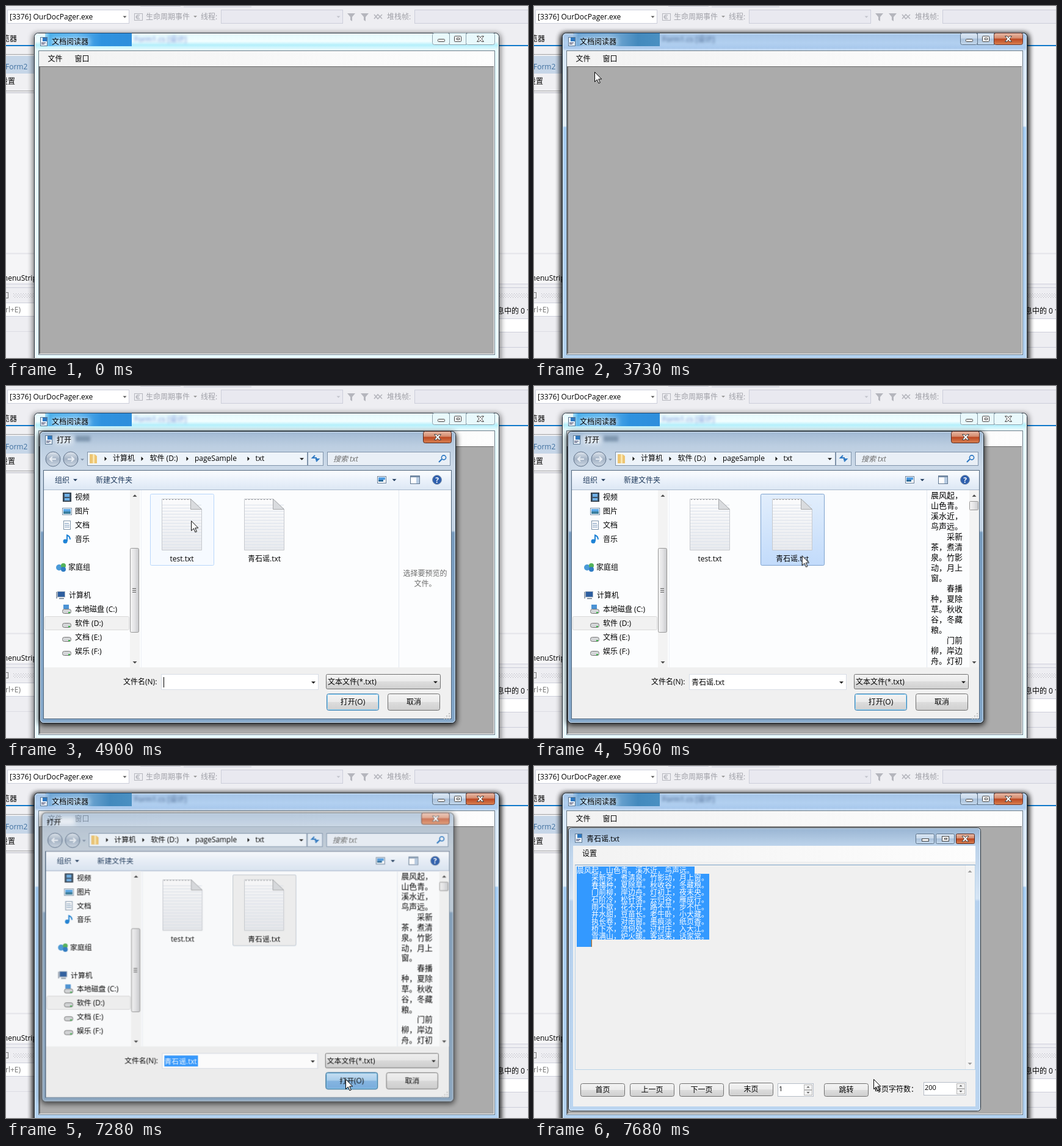
An HTML page that plays this animation: 855x578 px, repeating every 8 s.

```html
<!DOCTYPE html>
<html lang="zh-CN">
<head>
<meta charset="utf-8">
<title>文档阅读器</title>
<style>
html, body { margin: 0; width: 100%; height: 100%; overflow: hidden; background: #eeeef2; }
svg { display: block; width: 855px; height: 578px; font: 12px "Open Sans", "Noto Sans CJK SC", "Noto Sans CJK", sans-serif; }
text { white-space: pre; }
.mid { text-anchor: middle; }
.cjk { font-family: "Noto Sans CJK SC", "Noto Sans CJK", sans-serif; }
.anim { animation: 8s step-end infinite; }
/* One percent of the loop is 80 ms. */
#active { animation-name: active; animation-timing-function: linear; }
#menuHot { animation-name: menuHot; }
#menu { animation-name: menu; animation-timing-function: linear; }
#menuItemHot { animation-name: menuItemHot; }
#dialog { animation-name: dialog; animation-timing-function: linear; transform-origin: 395px 314px; }
#dialogGlass { animation-name: dialogGlass; }
#dialogIcon { animation-name: dialogIcon; }
#dialogTitle { animation-name: dialogTitle; }
#hoverA { animation-name: hoverA; }
#hoverB { animation-name: hoverB; }
#chosen, #preview { animation-name: chosen; }
#hint { animation-name: hint; }
#chosenDim, #nameMarked, #openDown { animation-name: accepted; }
#caret { animation-name: caret; }
#openHot { animation-name: openHot; }
#child { animation-name: child; }
#page { animation-name: page; }
#cursor { animation-name: cursor; animation-timing-function: linear; }
@keyframes active { 0%, 17.24% { opacity: 0 } 17.25%, 47.4% { opacity: 1 } 51.1%, 89.9% { opacity: 0 } 90%, 100% { opacity: 1 } }
@keyframes menuHot { 0% { opacity: 0 } 10.8% { opacity: 1 } 35.75%, 100% { opacity: 0 } }
@keyframes menu { 0%, 35.74% { opacity: 0 } 35.75%, 44.2% { opacity: 1 } 46.2%, 100% { opacity: 0 } }
@keyframes menuItemHot { 0% { opacity: 0 } 40.5%, 100% { opacity: 1 } }
@keyframes dialog {
  0%, 53.2% { opacity: 0; transform: scale(.96) }
  53.25% { opacity: .3; transform: scale(.97) }
  56.1%, 90% { opacity: 1; transform: none }
  91% { opacity: .96; transform: scale(.99) }
  93%, 100% { opacity: 0; transform: scale(.96) }
}
@keyframes dialogGlass { 0% { opacity: 1 } 90%, 100% { opacity: .78 } }
@keyframes dialogIcon { 0% { opacity: 1 } 90%, 100% { opacity: 0 } }
@keyframes dialogTitle { 0% { transform: none } 90%, 100% { transform: translate(-20px, 1px) } }
@keyframes hoverA { 0% { opacity: 0 } 59.5% { opacity: 1 } 66%, 100% { opacity: 0 } }
@keyframes hoverB { 0% { opacity: 0 } 67.5% { opacity: 1 } 72.6%, 100% { opacity: 0 } }
@keyframes chosen { 0% { opacity: 0 } 72.6%, 100% { opacity: 1 } }
@keyframes hint { 0% { opacity: 1 } 72.6%, 100% { opacity: 0 } }
@keyframes accepted { 0% { opacity: 0 } 89%, 100% { opacity: 1 } }
@keyframes caret { 0% { opacity: 0 } 58.8% { opacity: 1 } 65.5%, 100% { opacity: 0 } }
@keyframes openHot { 0% { opacity: 0 } 81.5%, 100% { opacity: 1 } }
@keyframes child { 0% { opacity: 0 } 94.75%, 100% { opacity: 1 } }
@keyframes page { 0% { opacity: 0 } 96%, 100% { opacity: 1 } }
@keyframes cursor {
  0%, 1.6% { transform: translate(738px, 590px) }
  1.65% { transform: translate(735px, 562px); animation-timing-function: ease-in-out }
  11.6% { transform: translate(78px, 91px) }
  12.6%, 27% { transform: translate(78px, 88px) }
  30%, 38.5% { transform: translate(71px, 83px) }
  41.4%, 53.2% { transform: translate(99px, 108px) }
  56.1%, 58% { transform: translate(250px, 162px) }
  61.25% { transform: translate(303px, 221px) }
  63%, 64% { transform: translate(312px, 232px) }
  70.75%, 73.5% { transform: translate(424px, 246px) }
  82.4% { transform: translate(553px, 530px) }
  83.1%, 85% { transform: translate(553px, 532px) }
  87.5%, 100% { transform: translate(556px, 514px) }
}
</style>
</head>
<body>
<svg id="stage" viewBox="0 0 855 578" xmlns="http://www.w3.org/2000/svg"></svg>
<script>
const FILE = '青石谣.txt';
const POEM = [
  '晨风起，山色青。溪水近，鸟声远。', '采新茶，煮清泉。竹影动，月上窗。',
  '春播种，夏除草。秋收谷，冬藏粮。', '门前柳，岸边舟。灯初上，夜未央。',
  '石阶冷，松针落。云归谷，雁成行。', '雨不歇，花不开。路不平，步不忙。',
  '井水甜，豆苗长。老牛卧，小犬藏。', '执长卷，对南窗。墨痕淡，纸页香。',
  '桥下水，流何处。过村庄，入大江。', '雪满山，炉火暖。客远来，话家常。'
];

const rect = (x, y, w, h, fill, more = '') =>
  `<rect x="${x}" y="${y}" width="${w}" height="${h}" fill="${fill}" ${more}/>`;
const box = (x, y, w, h, fill, stroke, r = 0, more = '') =>
  rect(x + .5, y + .5, w - 1, h - 1, fill, `stroke="${stroke}" rx="${r}" ${more}`);
const text = (x, y, s, fill = '#000', more = '') => `<text x="${x}" y="${y}" fill="${fill}" ${more}>${s}</text>`;
const mid = (x, y, s, fill = '#000') => text(x, y, s, fill, 'class="mid"');
const path = (d, fill, more = '') => `<path d="${d}" fill="${fill}" ${more}/>`;
const line = (d, stroke, w = 1, more = '') => path(d, 'none', `stroke="${stroke}" stroke-width="${w}" ${more}`);
const circle = (x, y, r, fill, more = '') => `<circle cx="${x}" cy="${y}" r="${r}" fill="${fill}" ${more}/>`;
const down = (x, y, fill = '#1c1c1c', s = 3.5) => path(`M${x - s} ${y - s / 2}h${2 * s}l${-s} ${s}z`, fill);
const up = (x, y, fill = '#444', s = 3.5) => path(`M${x - s} ${y + s / 2}h${2 * s}l${-s} ${-s}z`, fill);
const right = (x, y) => path(`M${x - 1.5} ${y - 3.5}v7l3.5 -3.5z`, '#111');
const group = (id, body) => `<g id="${id}" class="anim">${body}</g>`;
const gradient = (id, stops, across) =>
  `<linearGradient id="${id}" x2="${across ? 1 : 0}" y2="${across ? 0 : 1}">` +
  stops.map(([o, c, a = 1]) => `<stop offset="${o}" stop-color="${c}" stop-opacity="${a}"/>`).join('') + '</linearGradient>';
const blur = (id, d) => `<filter id="${id}" x="-30%" y="-80%" width="160%" height="260%"><feGaussianBlur stdDeviation="${d}"/></filter>`;
const shadow = (x, y, w, h, r, filter, opacity) => rect(x, y, w, h, '#000', `rx="${r}" filter="url(#${filter})" opacity="${opacity}"`);

const defs = `<defs>
  ${blur('soft', 2)}${blur('glow', 4)}
  <filter id="wide" x="-10%" y="-10%" width="120%" height="120%"><feGaussianBlur stdDeviation="5"/></filter>
  <pattern id="dots" width="4" height="4" patternUnits="userSpaceOnUse"><path d="M0 0h1v1H0zM2 2h1v1H2z" fill="#b2b2ba"/></pattern>
  ${gradient('pale', [[0, '#e2f9fd'], [.025, '#f2feff'], [.036, '#b4effb'], [.05, '#e8fcff'], [1, '#e9fbff']])}
  ${gradient('blue', [[0, '#a5c4e6'], [.03, '#b2d0f0'], [.045, '#a9c9ed'], [.054, '#d8e8f9'], [.28, '#e4effa'], [.285, '#a6cdf3'], [1, '#b4d3f1']])}
  ${gradient('tabPale', [[0, '#6fc4f3', .6], [.06, '#4aaeea'], [.35, '#62b6ef'], [.65, '#2f92df'], [1, '#2e8edc']], 1)}
  ${gradient('tabBlue', [[0, '#8fbbe2', .5], [.06, '#6fa6d6'], [.4, '#7fb0da'], [.75, '#4389bd'], [1, '#4a90c2']], 1)}
  ${gradient('strip', [[0, '#f2f2f2'], [1, '#fdfdfd']], 1)}
  ${gradient('red', [[0, '#e8bba8'], [.45, '#d58a6c'], [.5, '#bb4722'], [1, '#d98252']])}
  ${gradient('ctl', [[0, '#dbe7f4'], [.45, '#c8d9eb'], [.5, '#aac2dc'], [1, '#c4d8ec']])}
  ${gradient('button', [[0, '#f3f3f3'], [.48, '#ebebeb'], [.5, '#dddddd'], [1, '#cfcfcf']])}
  ${gradient('hot', [[0, '#eaf6fd'], [.48, '#d9f0fc'], [.5, '#bee6fd'], [1, '#a7d9f5']])}
  ${gradient('pressed', [[0, '#cbe3f6'], [.48, '#a9d0f0'], [.5, '#84b6e4'], [1, '#78aee0']])}
  ${gradient('glass', [[0, '#a0b8d2'], [.05, '#bccee1'], [.12, '#cbd9e8'], [.34, '#c3d3e4'], [.347, '#7a9dbf'], [1, '#84a7c9']])}
  ${gradient('tools', [[0, '#fbfdff'], [.5, '#eaf1fa'], [1, '#dce7f4']])}
  ${gradient('nav', [[0, '#dfe6ee'], [.5, '#a5b4c6'], [1, '#ccd7e3']])}
  ${gradient('pick', [[0, '#e2eefc'], [1, '#c2dbfb']])}
  ${gradient('paper', [[0, '#fbfbfc'], [1, '#e8eaee']])}
  ${gradient('thumb', [[0, '#f5f5f5'], [.5, '#e4e4e6'], [1, '#c9cacd']], 1)}
  ${gradient('childGlass', [[0, '#98b4d2'], [.06, '#bbd2ea'], [.25, '#d6e5f5'], [.26, '#b6d1ee'], [1, '#bbd5f0']])}
</defs>`;

function backdrop() {
  const combo = (x, w, fill) => box(x, 6, w, 23, fill, '#ccceda');
  const grey = '#a0a1a8';
  const funnel = x => path(`M${x} 12h13l-5 6v7l-3 -2v-5z`, '#b5b6bd');
  return rect(0, 0, 855, 578, '#eeeef2') +
    line('M220 .5h66M291 1.5h111', '#ccceda') +
    combo(2, 200, '#fff') + text(6, 22, '[3376] OurDocPager.exe') + down(194.5, 18, '#555', 3) +
    box(210, 12, 14, 12, 'none', '#b5b6bd') + line('M219 15h-4l-2 3l2 3h4M213 18h5', '#b5b6bd', 1.4) +
    text(229, 22, '生命周期事件', grey) + down(310, 17.5, '#999', 3) + text(319, 22, '线程:', grey) +
    combo(352, 200, '#e9e9f0') + down(544.5, 18, '#c2c3cb', 3) + funnel(559) + funnel(581) + circle(591, 22, 2, '#eeeef2') +
    line('M603 14l6 7l7 -7M603 21l6 -7l7 7', '#b5b6bd', 1.6) + text(624, 22, '堆栈帧:', grey) + combo(669, 190, '#e9e9f0') +
    text(-6, 58, '览器') + rect(0, 64, 855, 2, '#1079cb') +
    rect(0, 66, 855, 391, '#f5f5f7') + rect(0, 66, 46, 76, '#f0f0f3') +
    line('M0 79.5h46M0 139.5h46', '#555', 1, 'stroke-dasharray="1 1"') +
    rect(0, 82, 46, 29, '#c6d6e8') + text(-1, 104, 'Form2', '#3e6f9f') + text(-9, 128, '设置') +
    line('M0 142.5h46', '#b9bac4') + line('M0 406.5h855', '#e4e4ea', 2) + text(-8, 451, 'menuStrip1') +
    line('M0 456.5h855M0 462.5h855', '#ccceda') +
    rect(12, 472, 34, 7, 'url(#dots)') + rect(808, 472, 47, 7, 'url(#dots)') + box(-6, 470, 10, 10, 'none', '#777') +
    box(-2, 487, 60, 23, '#fff', '#ccceda') + text(-1, 503, 'rl+E)', '#777') +
    line('M0 534.5h46', '#dcdce4') + text(804, 505, '息中的 0 个') +
    box(790, 513, 80, 23, '#fff', '#ccceda') + line('M808 560.5h47', '#ccceda');
}

const appIcon = (x, y) => box(x, y, 12, 15, '#e8f1fa', '#5d7892') +
  rect(x + 4, y + 1, 7, 6, '#2e78c0') + line(`M${x + 2} ${y + 9.5}h7M${x + 2} ${y + 11.5}h5`, '#446');
const cross = (x, y) => path(
  `M${x - 5.5} ${y - 4.5}h3.5l2 2.5l2 -2.5h3.5l-3.5 4.5l3.5 4.5h-3.5l-2 -2.5l-2 2.5h-3.5l3.5 -4.5z`, '#fff', 'stroke="#444"');

function captionButtons(active) {
  const edge = active ? '#5d7288' : '#8fa3ae';
  const fill = active ? 'url(#ctl)' : '#e9f9fc';
  return box(698, 44, 29, 20, fill, edge, 3) + box(726, 44, 28, 20, fill, edge) +
    box(753, 44, 48, 20, active ? 'url(#red)' : fill, active ? '#6a3a32' : edge, 3) +
    box(707, 54, 12, 5, '#fff', '#444', 1) + box(734, 49, 12, 10, '#fff', '#444', 1) + box(738, 52, 5, 4, '#fff', '#444') +
    cross(777, 54);
}

function mainFrame(active) {
  return shadow(44, 45, 766, 545, 7, 'wide', active ? .85 : .55) +
    box(46, 44, 762, 545, active ? 'url(#blue)' : 'url(#pale)', '#22313d', 6) +
    box(47, 45, 760, 543, 'none', active ? '#e3f0fc' : '#fbffff', 5) +
    rect(64, 45, 142, 21, `url(#${active ? 'tabBlue' : 'tabPale'})`) + line('M66 44.5h140', '#1c4a75') +
    text(210, 59, 'Form1.cs [设计]', active ? '#3f5c86' : '#5e7fd0', 'filter="url(#soft)"') + captionButtons(active);
}

function mainWindow() {
  return mainFrame(false) + group('active', mainFrame(true)) +
    rect(76, 54, 60, 10, '#dff1ff', 'filter="url(#glow)" opacity=".9"') + appIcon(56, 51) + text(75, 63, '文档阅读器') +
    box(53, 73, 748, 500, '#f4f4f4', '#6a7a86') + rect(54, 74, 746, 25, 'url(#strip)') +
    rect(54, 99, 746, 473, '#fff') + rect(54, 99, 745, 472, '#696969') + rect(56, 100, 743, 471, '#ababab') +
    group('menuHot', box(60, 76, 44, 22, '#b9dcfb', '#3399ff')) + text(68.5, 91, '文件') + text(112.5, 91, '窗口');
}

function dropMenu() {
  return shadow(56, 101, 105, 65, 0, 'soft', .4) + box(60, 76, 44, 23, '#fafafa', '#808080') + text(68.5, 91, '文件') +
    box(53, 97, 106, 68, '#fdfdfd', '#808080') + rect(55, 99, 24, 64, '#f1f1f1') +
    group('menuItemHot', box(55, 99, 102, 21, '#b9dcfb', '#3399ff')) +
    ['打开', '关闭', '退出'].map((s, i) => text(87, 114 + 21 * i, s)).join('');
}

function sidebar() {
  const drive = y => box(92, y - 5, 15, 8, '#d4d6d8', '#777', 3) + rect(102, y, 3, 2, '#3db54a');
  const rows = [[113, 187, '视频'], [113, 210, '图片'], [113, 233, '文档'], [113, 256, '音乐'], [102, 302, '家庭组'], [103, 348, '计算机'],
    [113, 371, '本地磁盘 (C:)'], [113, 394, '软件 (D:)'], [113, 417, '文档 (E:)'], [113, 440, '娱乐 (F:)']];
  return box(63, 378, 139, 23, '#f1f1f1', '#d9d9d9', 2) +
    box(93, 175, 14, 15, '#3f5468', '#26323e') + rect(96, 177, 8, 5, '#6fb0e6') + rect(96, 184, 8, 4, '#6fb0e6') +
    box(92, 200, 16, 12, '#fff', '#7b92a8') + rect(94, 202, 12, 4, '#5aa7e6') + rect(94, 206, 12, 4, '#3b7f9f') +
    box(94, 221, 12, 15, '#fff', '#7b92a8') + line('M96 225.5h7M96 228.5h8M96 231.5h8', '#6c8fb5') +
    circle(97, 255, 3.5, '#1f83d6') + line('M100 255V245q5 2 5 7', '#1f83d6', 2) +
    circle(87, 298, 5, '#4a9ad8') + circle(94, 295, 4, '#54b35a') + circle(94, 301, 4, '#2f7cc4') +
    box(84, 337, 13, 10, '#2d5e9f', '#a8b4c2') + rect(87, 348, 8, 2, '#8c98a6') + rect(82, 338, 2, 11, '#9aa6b3') +
    drive(371) + rect(94, 359, 9, 7, '#4b92d4') + [394, 417, 440].map(drive).join('') +
    rows.map(([x, y, s]) => text(x, y, s)).join('') +
    rect(203, 171, 16, 291, '#f3f3f3') + up(211, 180) + down(211, 454, '#444') +
    box(203, 266, 15, 139, 'url(#thumb)', '#979797', 2) + line('M207 332.5h6M207 335.5h6M207 338.5h6', '#555') +
    line('M221.5 171v291', '#eef1f6');
}

function fileItem(x, label, state) {
  let rules = '';
  for (let y = 195; y < 268; y += 5) rules += `M${x + 20} ${y}.5h64`;
  return state + path(`M${x + 19.5} 185.5h47l18 17v67h-65z`, 'url(#paper)', 'stroke="#c6c9ce"') + line(rules, '#dde3ec') +
    path(`M${x + 66.5} 185.5v17h18z`, '#d9dbde', 'stroke="#a6a8ab"') +
    line(`M${x + 21} 186.5h46`, '#8f9296', 1, 'stroke-dasharray="2 3"') + mid(x + 52, 288, label);
}

function previewPane() {
  const rows = POEM.flatMap((s, i) => (i ? '　　' + s : s).match(/.{1,4}/g)).slice(0, 17);
  return rows.map((s, i) => text(650, 184 + 17 * i, s, '#000', 'class="cjk" font-size="13"')).join('') +
    rect(713, 171, 16, 291, '#f3f3f3') + up(721, 180) + down(721, 454, '#444') + box(713, 189, 15, 15, 'url(#thumb)', '#979797', 1);
}

function dialog() {
  const itemBox = (x, fill, stroke) => box(x, 177, 105, 118, fill, stroke, 2);
  const navy = '#1e395b';
  const navButton = (x, d) => circle(x, 120, 12, 'url(#nav)', 'stroke="#5d7088"') + line(`M${x - 5 * d} 120h${10 * d}m${-4 * d} -4l${4 * d} 4l${-4 * d} 4`, '#e9eef4', 2.2);
  const openButton = (fill, edge) => box(525, 505, 86, 28, fill, edge, 3) + box(526, 506, 84, 26, 'none', '#8fd3f5', 2);
  const frame = group('dialogGlass', shadow(54, 76, 684, 481, 7, 'wide', .85) + box(55, 74, 682, 480, 'url(#glass)', '#17222c', 6) +
    box(56, 75, 680, 478, 'none', '#d5e4f2', 5) + rect(80, 82, 30, 13, '#fff', 'filter="url(#glow)" opacity=".7"') +
    box(683, 74, 47, 20, 'url(#red)', '#57271d', 3) + cross(707, 84)) +
    group('dialogIcon', appIcon(64, 81) + rect(114, 82, 24, 9, '#5f7893', 'filter="url(#soft)" opacity=".6"')) +
    group('dialogTitle', text(83, 93, '打开'));
  const address = navButton(77, -1) + navButton(106, 1) + down(125, 121, '#7b8da2', 3) +
    box(133, 108, 361, 23, '#eef4fa', '#7f93aa') + box(494, 108, 26, 23, '#e3ecf5', '#7f93aa') +
    path('M137 112h8l4 3v12h-12z', '#edc573') + rect(142, 112, 3, 15, '#fae6ad') +
    [163, 223, 297, 397].map(x => right(x, 119.5)).join('') +
    text(175, 123, '计算机') + text(235.5, 123, '软件 (D:)') + text(309, 123, 'pageSample') + text(408.5, 123, 'txt') + down(484.5, 120) +
    line('M506 114l-4 4h6v4M508 124l4 -4h-4', '#2d78c2', 2) +
    box(526, 108, 202, 23, '#e9eff6', '#7f93aa') + text(536, 124, '搜索 txt', '#6d6d6d', 'font-style="italic"') +
    circle(717, 117.5, 3.6, 'none', 'stroke="#2d78c2" stroke-width="1.6"') + line('M714 120l-5 5', '#2d78c2', 2.2);
  const tools = rect(62, 139, 667, 32, 'url(#tools)') + line('M62 170.5h667', '#a9b8cc') +
    text(80, 159, '组织', navy) + down(113.5, 154.5, navy) + text(147, 159, '新建文件夹', navy) +
    box(608, 148, 15, 12, '#fff', '#6a7f98') + rect(610, 150, 11, 4, '#4f9be0') + rect(610, 154, 8, 3, '#2a6a9a') + down(636, 154.5, navy) +
    box(662, 147, 16, 14, '#fff', '#5f7690') + rect(663, 148, 14, 2, '#7d93ad') + rect(672, 150, 5, 10, '#b7cbe2') +
    circle(706, 154, 7.5, '#2e5fae', 'stroke="#8496ad"') + text(706, 158.5, '?', '#fff', 'class="mid" font-weight="700"');
  const files = fileItem(236, 'test.txt', group('hoverA', itemBox(236, '#f6faff', '#b8d6fb'))) +
    fileItem(371, FILE, group('hoverB', itemBox(371, '#f6faff', '#b8d6fb')) +
      group('chosen', itemBox(371, 'url(#pick)', '#7da2ce')) + group('chosenDim', itemBox(371, '#f0f0f0', '#d9d9d9'))) +
    line('M643.5 171v291', '#e3e8f0') + group('hint', mid(686.5, 312, '选择要预览的', '#6d6d6d') + mid(686.5, 329, '文件。', '#6d6d6d')) +
    group('preview', previewPane() + text(258, 491, FILE));
  const footer = text(192, 490, '文件名(N):') + box(254, 473, 258, 26, '#fff', '#d8dde6');
  const controls = down(503.5, 487) + group('caret', rect(258, 478, 1, 17, '#000')) +
    group('nameMarked', rect(258, 477, 55, 18, '#3399ff') + text(258, 491, FILE, '#fff')) +
    box(524, 473, 188, 25, 'url(#button)', '#707070', 2) + text(527, 490, '文本文件(*.txt)') + down(703.5, 486.5) +
    openButton('url(#button)', '#3c7fb1') + group('openHot', openButton('url(#hot)', '#3c7fb1')) +
    group('openDown', openButton('url(#pressed)', '#2c628b')) + mid(568, 523, '打开(O)') +
    box(625, 505, 86, 28, 'url(#button)', '#707070', 3) + mid(668, 523, '取消') +
    path('M725 537h2v2h-2zM721 541h2v2h-2zM725 541h2v2h-2zM717 545h2v2h-2zM721 545h2v2h-2zM725 545h2v2h-2z', '#c2c2c2');
  return frame + address + box(61, 138, 669, 409, '#fcfdfe', '#4f657c') + tools + rect(62, 462, 667, 84, '#f0f0f0') +
    sidebar() + footer + files + controls;
}

function childWindow() {
  const button = (x, y, s, w = 73) => box(x, y, w, 22, 'url(#button)', '#707070', 3) + mid(x + w / 2, y + 15, s);
  const spinner = (x, y, w, s) => box(x, y, w, 22, '#fff', '#b5bcc6') + text(x + 2, y + 13, s, '#000', 'font-size="11"') +
    box(x + w - 16, y + 2, 14, 9, '#f2f2f2', '#b8b8b8') + box(x + w - 16, y + 11, 14, 9, '#f2f2f2', '#b8b8b8') +
    up(x + w - 9, y + 6, '#555', 2.5) + down(x + w - 9, y + 15.5, '#555', 2.5);
  const caption = [625, 658, 691].map((x, i) => box(x, 111, 31, 17, i < 2 ? 'url(#ctl)' : 'url(#red)', i < 2 ? '#5d7288' : '#57271d', 2)).join('') +
    box(635, 119, 12, 5, '#fff', '#444') + box(668, 115, 12, 9, '#fff', '#444') + box(672, 118, 5, 3, '#fff', '#444') + cross(706.5, 119.5);
  const page = rect(70, 165, 193, 12, '#3399ff') + rect(70, 177, 217, 108, '#3399ff') + rect(70, 285, 24, 12, '#3399ff') +
    POEM.map((s, i) => text(i ? 94 : 70, 175.5 + 12 * i, s, '#fff', 'class="cjk"')).join('') + rect(94, 285, 1, 12, '#cc6600');
  return box(56, 101, 676, 466, 'url(#childGlass)', '#1c2833', 5) + box(57, 102, 674, 464, 'none', '#e0eefb', 4) +
    appIcon(67, 111) + text(86, 124, FILE) + caption +
    rect(64, 131, 659, 428, '#f0f0f0') + rect(64, 131, 659, 26, 'url(#strip)') + text(79, 148, '设置') +
    box(67, 162, 656, 337, '#f0f0f0', '#b9d3e8') + line('M67 162.5h656', '#7ba3c8') +
    rect(706, 163, 16, 335, '#f4f4f4') + line('M706.5 163v335', '#e6e6e6') + up(714, 173, '#999') + down(714, 489, '#999') +
    button(76, 521, '首页') + button(157, 521, '上一页') + button(238, 521, '下一页') + button(319, 520, '末页') +
    spinner(399, 521, 59, '1') + button(475, 521, '跳转') + text(557, 535, '每页字符数：') + spinner(638, 519, 70, '200') +
    group('page', page);
}

const pointer = path('M.5 .5v16l3.8 -3.6l2.6 6l2.4 -1l-2.6 -5.9h5z', '#fff', 'stroke="#000"');

document.getElementById('stage').innerHTML = defs + backdrop() + mainWindow() + group('menu', dropMenu()) +
  group('dialog', dialog()) + group('child', childWindow()) + group('cursor', pointer);
</script>
</body>
</html>
```
